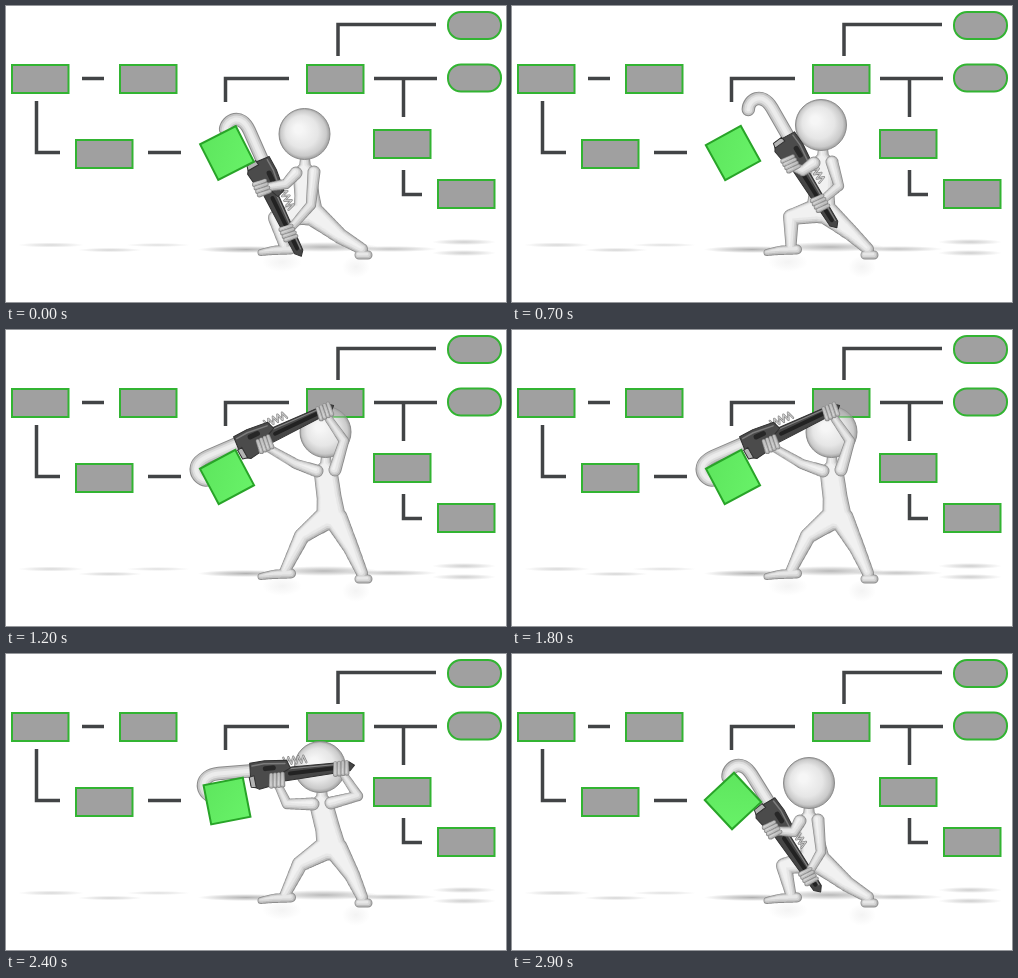
An HTML page with a canvas that plays this animation: 500 by 296 pixels, repeating every 3 s.

```html
<!DOCTYPE html>
<html lang="en">
<head>
<meta charset="utf-8">
<title>Process wrench</title>
<style>
html, body { margin: 0; width: 100%; height: 100%; overflow: hidden; background: #fff; }
canvas { display: block; width: 500px; height: 296px; }
</style>
</head>
<body>
<canvas id="stage" width="500" height="296"></canvas>
<script>
const ctx = document.getElementById('stage').getContext('2d');
const LOOP = 3000, STEP = 100, TAU = Math.PI * 2;
const rad = deg => deg * Math.PI / 180;
const mix = (a, b, k) => a + (b - a) * k;

// Joints are [x, y]; turn is the wrench angle, block the green square's angle.
const grip = {
  head: [298.5, 128], neck: [299, 158], hip: [302, 207],
  elbow1: [280, 178], elbow2: [305, 199], knee1: [270, 212], knee2: [334, 230],
  jaw: [256, 166], turn: [65], reach: [66], block: [-27]
};
const lift = {
  head: [309, 119], neck: [311, 148], hip: [309, 205],
  elbow1: [291, 165], elbow2: [327, 180], knee1: [279, 211], knee2: [340, 228],
  jaw: [277, 142], turn: [59], reach: [63], block: [-29]
};
const regrip = {
  head: [319.5, 102], neck: [320, 132], hip: [325, 188],
  elbow1: [290, 134], elbow2: [338, 111], knee1: [296, 206], knee2: [345, 218],
  jaw: [243, 114], turn: [-24.5], reach: [82], block: [-28]
};
const pull = {
  head: [314, 113], neck: [316, 141], hip: [325, 194],
  elbow1: [281, 150], elbow2: [352, 142], knee1: [294, 210], knee2: [346, 221],
  jaw: [256, 121], turn: [-6], reach: [79], block: [-11]
};
const press = {
  head: [297, 129], neck: [297, 158], hip: [303, 207],
  elbow1: [282, 178], elbow2: [309, 198], knee1: [272, 212], knee2: [335, 230],
  jaw: [258, 160], turn: [57], reach: [73], block: [47]
};

const linear = k => k;
const easeIn = k => k * k;
const easeOut = k => k * (2 - k);
const track = [
  [0, grip, linear], [400, grip, easeIn], [700, lift, easeOut], [1200, regrip, linear],
  [1800, regrip, easeIn], [2400, pull, linear], [2900, press, linear],
  [LOOP, { ...grip, block: [63] }, linear]
];

function poseAt(t) {
  let i = 0;
  while (t >= track[i + 1][0]) i++;
  const [t0, a, ease] = track[i], [t1, b] = track[i + 1];
  const k = ease((t - t0) / (t1 - t0));
  const pose = {};
  for (const key in a) pose[key] = a[key].map((v, n) => mix(v, b[key][n], k));
  return pose;
}

function polyline(points, color, width) {
  ctx.beginPath();
  points.forEach(([x, y]) => ctx.lineTo(x, y));
  ctx.strokeStyle = color;
  ctx.lineWidth = width;
  ctx.stroke();
}

function box(x, y, w, h, radius = 0) {
  ctx.beginPath();
  ctx.roundRect(x, y, w, h, radius);
  ctx.fillStyle = '#a0a0a0';
  ctx.fill();
  ctx.strokeStyle = '#32b432';
  ctx.lineWidth = 2;
  ctx.stroke();
}

function drawChart() {
  ctx.lineCap = 'butt';
  ctx.lineJoin = 'miter';
  [
    [[76, 72.5], [98, 72.5]],
    [[30.5, 95], [30.5, 146.5], [54, 146.5]],
    [[142, 146.5], [175, 146.5]],
    [[219.5, 96], [219.5, 72.5], [283, 72.5]],
    [[332, 50], [332, 18.5], [430, 18.5]],
    [[368, 72.5], [431, 72.5]],
    [[397.5, 72.5], [397.5, 111]],
    [[397.5, 164], [397.5, 188.5], [416, 188.5]]
  ].forEach(line => polyline(line, '#424446', 3.5));
  [[6, 59], [114, 59], [70, 134], [301, 59], [368, 124], [432, 174]]
    .forEach(([x, y]) => box(x, y, 56.5, 28));
  box(442, 6, 53, 27, 13);
  box(442, 58.5, 53, 27, 13);
}

function softSpot(x, y, rx, ry, alpha) {
  ctx.save();
  ctx.translate(x, y);
  ctx.scale(rx, ry);
  const g = ctx.createRadialGradient(0, 0, 0, 0, 0, 1);
  g.addColorStop(0, `rgba(60,60,60,${alpha})`);
  g.addColorStop(0.5, `rgba(80,80,80,${alpha * 0.6})`);
  g.addColorStop(1, 'rgba(90,90,90,0)');
  ctx.fillStyle = g;
  ctx.fillRect(-1, -1, 2, 2);
  ctx.restore();
}

function drawGround() {
  [
    [45, 239, 33, 2.5, 0.2], [104, 244, 32, 2.2, 0.22], [152, 239, 32, 2, 0.17],
    [240, 243.5, 48, 3.5, 0.4], [318, 241, 54, 5, 0.36], [385, 243, 46, 3, 0.3],
    [458, 236, 32, 3, 0.25], [458, 247, 32, 3, 0.25],
    [276, 256, 20, 10, 0.06], [350, 261, 14, 11, 0.06]
  ].forEach(spot => softSpot(...spot));
}

const shades = [[0, 0, '#8d8d8d'], [0.8, 0.15, '#bdbdbd'], [1.9, 0.5, '#d6d6d6'], [3.2, 0.9, '#e7e7e7'], [5, 1.4, '#f1f1f1']];

// Each limb is a chain of [x, y, radius]; all limbs share the shading passes.
function drawLimbs(limbs) {
  for (const [inset, shift, color] of shades) {
    ctx.fillStyle = color;
    ctx.beginPath();
    for (const limb of limbs) {
      for (let i = 0; i + 1 < limb.length; i++) {
        const [x0, y0, r0] = limb[i], [x1, y1, r1] = limb[i + 1];
        const count = Math.ceil(Math.hypot(x1 - x0, y1 - y0)) + 1;
        for (let n = 0; n <= count; n++) {
          const k = n / count, r = mix(r0, r1, k) - inset;
          if (r <= 0) continue;
          const x = mix(x0, x1, k) - shift, y = mix(y0, y1, k) - shift;
          ctx.moveTo(x + r, y);
          ctx.arc(x, y, r, 0, TAU);
        }
      }
    }
    ctx.fill();
  }
}

function drawHead([x, y]) {
  const g = ctx.createRadialGradient(x - 6, y - 5, 4, x, y, 26);
  g.addColorStop(0, '#f6f6f6');
  g.addColorStop(0.55, '#e6e6e6');
  g.addColorStop(0.85, '#cacaca');
  g.addColorStop(1, '#989898');
  ctx.beginPath();
  ctx.arc(x, y, 25.5, 0, TAU);
  ctx.fillStyle = g;
  ctx.fill();
  ctx.strokeStyle = '#8c8c8c';
  ctx.lineWidth = 1;
  ctx.stroke();
  // The chart box shows through the top of the head.
  ctx.save();
  ctx.clip();
  ctx.globalAlpha = 0.5;
  box(301, 59, 56.5, 28);
  ctx.restore();
}

function shape(points, fill) {
  ctx.beginPath();
  points.forEach(([x, y]) => ctx.lineTo(x, y));
  ctx.closePath();
  ctx.fillStyle = fill;
  ctx.fill();
  ctx.strokeStyle = '#303030';
  ctx.lineWidth = 1;
  ctx.stroke();
}

function drawWrench({ jaw, turn }) {
  ctx.save();
  ctx.translate(...jaw);
  ctx.rotate(rad(turn[0]));
  ctx.lineJoin = ctx.lineCap = 'round';

  for (const [width, color] of [[13.5, '#8a8a8a'], [11.5, '#c4c4c4'], [8, '#dedede'], [4, '#ececec']]) {
    ctx.beginPath();
    ctx.moveTo(4, -5);
    ctx.lineTo(-43, -6);
    ctx.bezierCurveTo(-63, -6, -62, 10, -54, 15);
    ctx.strokeStyle = color;
    ctx.lineWidth = width;
    ctx.stroke();
  }

  const spring = Array.from({ length: 10 }, (_, i) => [23 + i * 2.5, i % 2 ? -8 : -15]);
  polyline(spring, '#858585', 2.2);
  polyline(spring, '#d0d0d0', 0.9);

  shape([[8, -6], [30, -5], [88, -4], [93, 0], [88, 5], [30, 8], [8, 9]], '#464646');
  polyline([[28, 1.5], [84, 0.5]], '#222', 4);
  polyline([[26, -3.5], [86, -2.5]], '#858585', 1.2);
  shape([[-11, -13], [4, -14], [26, -12], [29, -4], [14, 3], [13, 11], [-4, 14], [-12, 9]], '#4b4b4b');
  polyline([[-9, -10], [3, -11], [24, -9]], '#7c7c7c', 1.5);
  polyline([[4, -6], [12, -6]], '#272727', 5);
  shape([[-13, 1], [-8, 0], [-7, 12], [-12, 11]], '#b4b4b4');
  ctx.restore();
}

function drawBlock(angle) {
  ctx.save();
  ctx.translate(221, 147);
  ctx.rotate(rad(angle));
  const g = ctx.createLinearGradient(-20, -20, 20, 20);
  g.addColorStop(0, '#5ee65e');
  g.addColorStop(1, '#68f268');
  ctx.fillStyle = g;
  ctx.strokeStyle = '#28a428';
  ctx.lineWidth = 2;
  ctx.lineJoin = 'miter';
  ctx.beginPath();
  ctx.rect(-20, -20, 40, 40);
  ctx.fill();
  ctx.stroke();
  ctx.restore();
}

function wrenchPoint({ jaw, turn }, u, v) {
  const c = Math.cos(rad(turn[0])), s = Math.sin(rad(turn[0]));
  return [jaw[0] + u * c - v * s, jaw[1] + u * s + v * c];
}

function drawArm(pose, shoulder, elbow, u, v) {
  const hand = wrenchPoint(pose, u, v);
  drawLimbs([[[...shoulder, 6.5], [...elbow, 5.2], [...hand, 4]]]);
  for (let i = -1; i <= 2; i++) {
    const at = u + i * 3.8 - 2;
    drawLimbs([[[...wrenchPoint(pose, at, v + 3), 2.6], [...wrenchPoint(pose, at + 1, v - 8), 2.1]]]);
  }
}

function drawBody({ neck: [nx, ny], hip: [hx, hy], knee1, knee2, head }) {
  drawLimbs([
    [[hx + 5, hy + 1, 12], [...knee2, 8], [356, 243, 6]],
    [[353, 249, 4.5], [362, 249, 4.5]],
    [[hx - 5, hy, 12], [...knee1, 8], [279, 241, 5.5]],
    [[285, 243.5, 5], [267, 244.5, 4.5], [255, 246.5, 3.5]],
    [[nx, ny - 6, 5], [nx, ny + 3, 6], [nx, ny + 12, 12], [mix(nx, hx, 0.65), mix(ny, hy, 0.65), 12.5], [hx, hy - 2, 14.5]]
  ]);
  drawHead(head);
}

function draw(t) {
  const pose = poseAt(t);
  const [nx, ny] = pose.neck;
  ctx.fillStyle = '#fff';
  ctx.fillRect(0, 0, 500, 296);
  drawChart();
  drawGround();
  drawBody(pose);
  drawWrench(pose);
  drawBlock(pose.block[0]);
  drawArm(pose, [nx - 9, ny + 9], pose.elbow1, 14, 9);
  drawArm(pose, [nx + 9, ny + 8], pose.elbow2, pose.reach[0], 4);
}

function tick() {
  const t = performance.now() % LOOP;
  draw(Math.floor(t / STEP) * STEP);
  requestAnimationFrame(tick);
}
tick();
</script>
</body>
</html>
```
